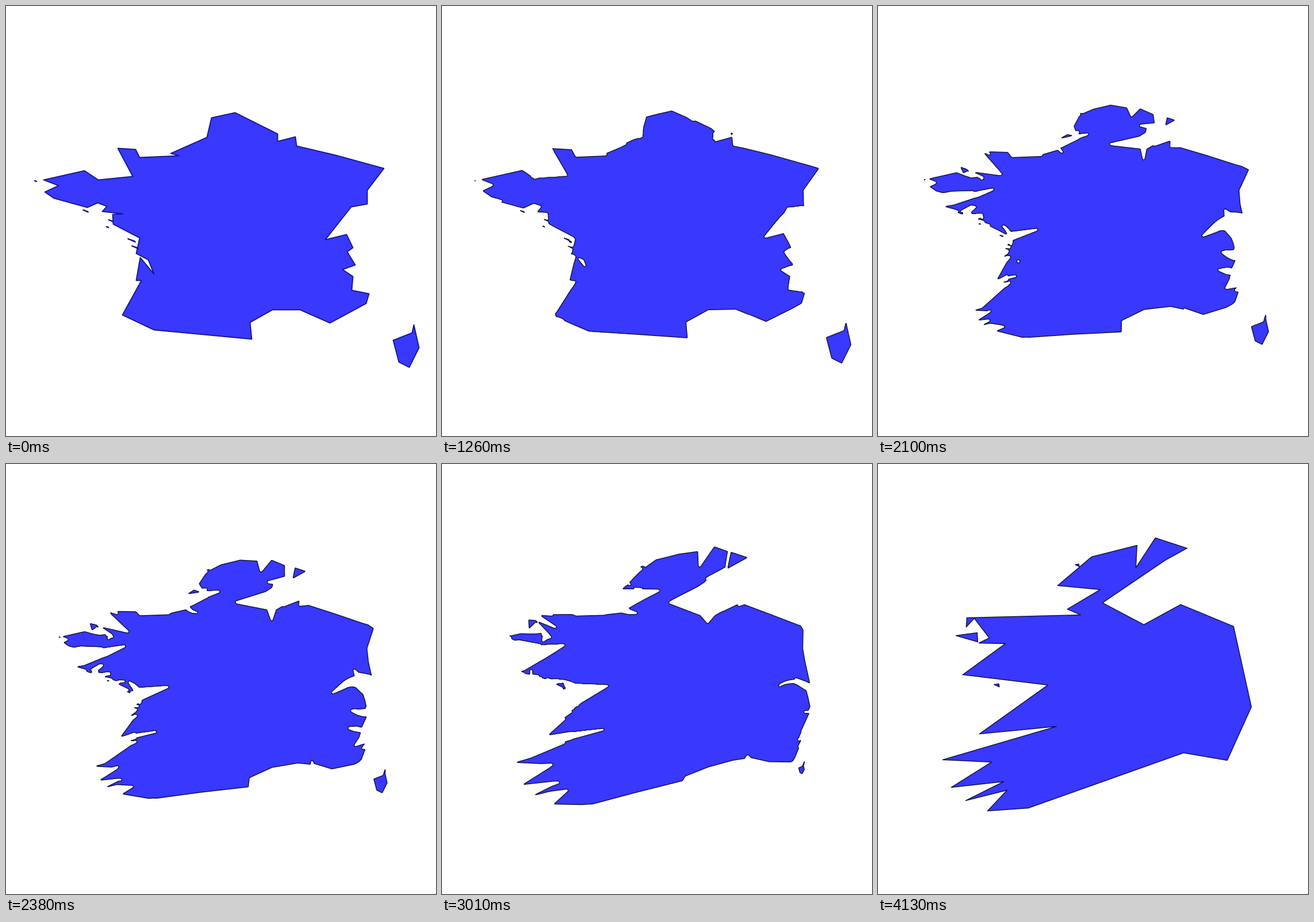
Write a matplotlib script that moves like this. It is 748 px wide and 748 px high and loops after 4.83 s.

```python
import numpy as np
import matplotlib.pyplot as plt
from matplotlib.animation import FuncAnimation
from matplotlib.patches import PathPatch
from matplotlib.path import Path

SIZE, DPI = 748, 100
STEP_MS, HOLD, STEPS = 70, 10, 50
FRAMES = STEPS + 2 * HOLD - 1
FILL, EDGE, START_EDGE = "#3838ff", "#10103a", "#141488"
CLOSE_R2 = 6   # squared radius of the gap-closing disc
BLEED = 0.3    # in-between outlines run slightly outside the shape
FAR = 3.0


def speck(x, y, length, fat=0.15):
    """Small tilted triangle around a centre."""
    corners = [(-0.5, -0.2), (0.4, 0.25 - fat), (0.5, 0.25)]
    return [(x + length * u, y + length * v) for u, v in corners]


# Only the corners that shape the coast
north = [(194, 247), (225, 249), (232, 263), (301, 260), (286, 256), (349, 228),
         (357, 194), (398, 185), (472, 222), (472, 235), (503, 227), (505, 243),
         (573, 259), (657, 282)]
east = [(628, 320), (628, 344), (600, 349), (555, 406), (592, 397), (603, 420),
        (593, 427), (607, 450), (585, 458), (603, 470), (601, 494), (631, 500),
        (626, 517)]
south = [(563, 551), (511, 528), (463, 528), (424, 550), (427, 579), (257, 563),
         (202, 537)]
west = [(235, 477), (226, 477), (233, 437), (257, 466), (247, 441), (226, 430),
        (232, 403), (186, 379), (185, 362), (203, 361), (167, 357), (175, 348),
        (159, 342), (141, 350), (83, 334), (67, 323), (91, 312), (65, 302),
        (136, 286), (160, 302), (220, 296)]
island = [(709, 554), (718, 594), (701, 628), (683, 619), (673, 581), (706, 568)]
islets = [speck(*s) for s in ((51, 304, 4), (138, 356, 9), (182, 373, 8),
                              (176, 384, 4), (218, 407, 13), (224, 419, 11))]
START = [north + east + south + west, island] + islets

head = [(329, 252), (386, 218), (312, 211), (371, 161), (450, 141), (448, 180),
        (482, 128), (537, 146), (499, 167), (390, 241)]
back = [(462, 279), (526, 244), (618, 282), (649, 422), (607, 515), (531, 502),
        (261, 598)]
fringe = [(190, 603), (224, 567), (152, 585), (218, 552), (127, 562), (197, 518),
          (112, 514), (310, 456), (176, 469), (295, 384), (147, 366), (221, 312),
          (175, 311), (193, 302), (167, 268), (153, 283), (154, 267), (352, 262)]
flake = [(135, 298), (172, 293), (173, 309)]
END = [head + back + fringe, flake, speck(346, 176, 7, 0.6), speck(206, 385, 9, 0.6)]

X0, X1, Y0, Y1 = 40, 730, 115, 640
X, Y = np.meshgrid(np.arange(X0, X1, dtype=np.float32),
                   np.arange(Y0, Y1, dtype=np.float32))


def measure(rings):
    """Signed distance and nearest boundary point for every grid point."""
    best = np.full(X.shape, np.inf, np.float32)
    near_x, near_y = np.zeros_like(X), np.zeros_like(X)
    inside = np.zeros(X.shape, bool)
    for ring in rings:
        for (xa, ya), (xb, yb) in zip(ring, ring[1:] + ring[:1]):
            dx, dy = xb - xa, yb - ya
            t = np.clip(((X - xa) * dx + (Y - ya) * dy) / (dx * dx + dy * dy), 0, 1)
            qx, qy = xa + t * dx, ya + t * dy
            d = (X - qx) ** 2 + (Y - qy) ** 2
            closer = d < best
            for dst, src in ((best, d), (near_x, qx), (near_y, qy)):
                np.copyto(dst, src, where=closer)
            if dy:
                inside ^= ((Y < ya) != (Y < yb)) & (X < xa + (Y - ya) * dx / dy)
    dist = np.sqrt(best)
    return np.where(inside, -dist, dist), near_x, near_y


def sample(fields, x, y):
    """Bilinear lookup of several fields at the same points."""
    h, w = X.shape
    u = np.clip(x - X0, 0, w - 1.001)
    v = np.clip(y - Y0, 0, h - 1.001)
    i, j = u.astype(int), v.astype(int)
    fu, fv = u - i, v - j
    result = []
    for f in fields:
        top = f[j, i] * (1 - fu) + f[j, i + 1] * fu
        low = f[j + 1, i] * (1 - fu) + f[j + 1, i + 1] * fu
        result.append(top * (1 - fv) + low * fv)
    return result


def pulled(shape, other, s):
    """Field of a shape whose points move to the nearest point of the other,
    keeping the fraction s of their distance."""
    sd = shape[0]
    osd, near_x, near_y = other
    out = np.maximum(osd, 0)
    reach = out[sd < 1].max()
    field = np.where(osd > 0, FAR, s * sd).astype(np.float32)
    m = (osd > 0) & (osd < s * reach + 3)
    cx, cy = near_x[m], near_y[m]
    x, y = cx + (X[m] - cx) / s, cy + (Y[m] - cy) / s
    d, o = sample((sd, out), x, y)
    gap = out[m] / s - o
    field[m] = np.minimum(s * np.maximum(d, 3 * (gap - 0.4)), FAR)
    return field


R = int(CLOSE_R2 ** 0.5)
DISC = [(a, b) for a in range(-R, R + 1) for b in range(-R, R + 1)
        if a * a + b * b <= CLOSE_R2]


def spread(field, pick):
    h, w = field.shape
    wide = np.pad(field, R, mode="edge")
    result = field.copy()
    for a, b in DISC:
        pick(result, wide[R + a:R + a + h, R + b:R + b + w], out=result)
    return result


def ease(t):
    return 2 * t * t if t < 0.5 else 1 - 2 * (1 - t) ** 2


def outline(rings):
    return Path.make_compound_path(
        *[Path(ring + ring[:1], closed=True) for ring in rings])


fig = plt.figure(figsize=(SIZE / DPI, SIZE / DPI), dpi=DPI, facecolor="white")
ax = fig.add_axes([0, 0, 1, 1])
ax.axis("off")

start, end = measure(START), measure(END)
paths = {0: outline(START), STEPS: outline(END)}


def frame_axes():
    ax.set_xlim(-0.5, SIZE - 0.5)
    ax.set_ylim(SIZE - 0.5, -0.5)


def morph(step):
    if step not in paths:
        k = ease(step / STEPS)
        field = np.minimum(pulled(start, end, 1 - k), pulled(end, start, k))
        field = spread(spread(field, np.minimum), np.maximum)
        lines = ax.contour(X - BLEED, Y - BLEED, field, levels=[BLEED])
        paths[step] = lines.get_paths()[0]
        lines.remove()
        frame_axes()
    return paths[step]


frame_axes()
patch = ax.add_patch(PathPatch(paths[0], facecolor=FILL, joinstyle="round"))


def update(i):
    step = min(max(i - HOLD + 1, 0), STEPS)
    patch.set_path(morph(step))
    patch.set_edgecolor(EDGE if step else START_EDGE)
    patch.set_linewidth((1.4 if step else 1.8) * 72 / DPI)
    return [patch]


anim = FuncAnimation(fig, update, frames=FRAMES, interval=STEP_MS,
                     repeat=True, repeat_delay=0, blit=False)
plt.show()
```
